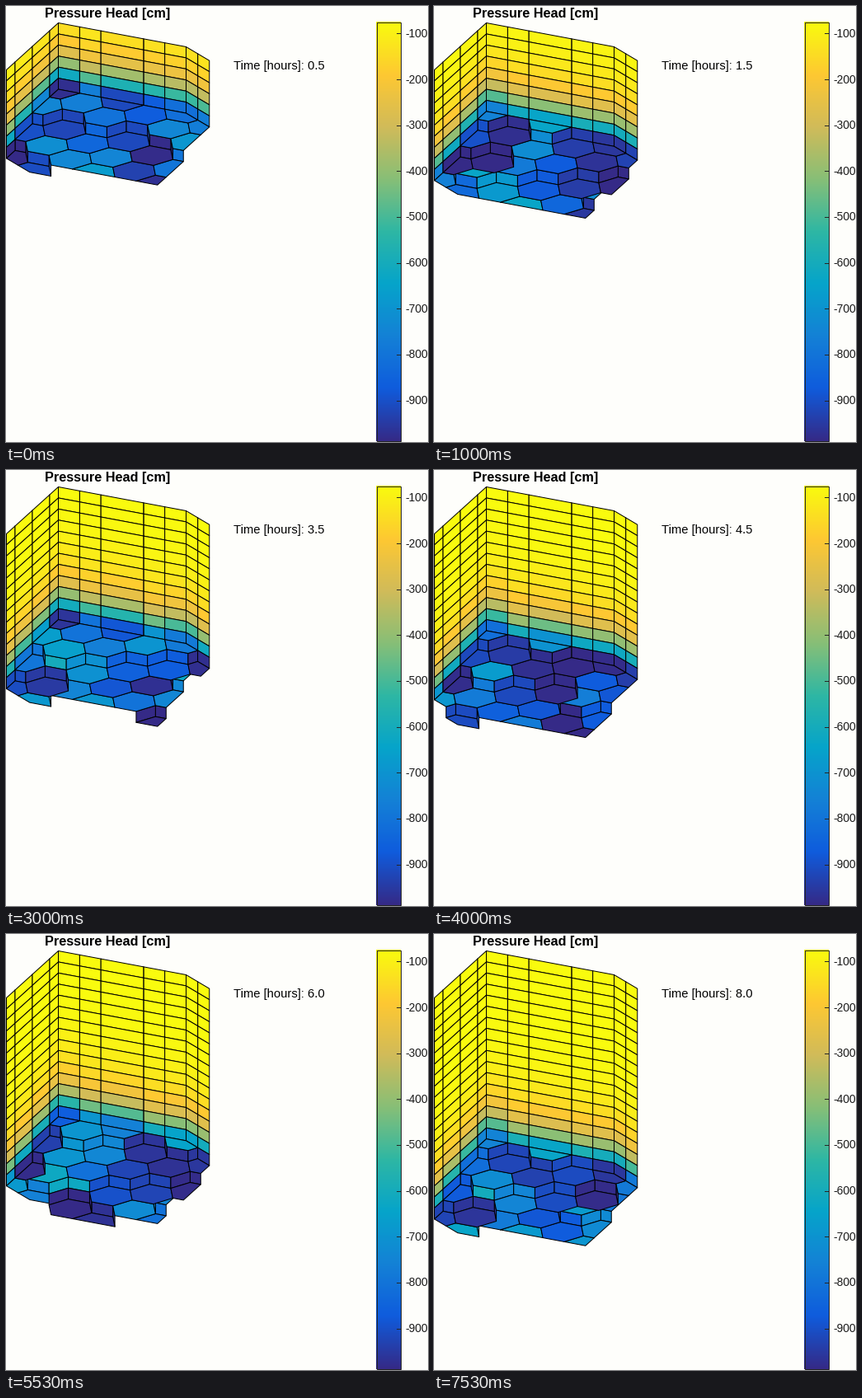
Animation, 512 px wide and 529 px high, one loop 8000 ms. Source, as a matplotlib script:

```python
import numpy as np
import matplotlib.pyplot as plt
from matplotlib.animation import FuncAnimation
from matplotlib.collections import PolyCollection
from matplotlib.colors import LinearSegmentedColormap, Normalize
from matplotlib.patches import Rectangle

W, H, DPI = 512, 529, 128
PX = 72 / DPI
FRAMES, INTERVAL = 16, 500
LAYER = 13.42
WET, DRY = -75, -988
plt.rcParams["font.family"] = "Liberation Sans"

CMAP = LinearSegmentedColormap.from_list("heads", [
    "#352a87", "#0f5cdd", "#1481d6", "#06a4ca", "#2eb7a4",
    "#87bf77", "#d1bb59", "#fec832", "#f9fb0e"])
NORM = Normalize(DRY, WET, clip=True)

# Domain outline as half planes a*k + b*i <= c
WALLS = [(-1, 0, 0), (1, 0, 5), (0, 1, 3), (0, -1, 0.5), (-0.5, -1, 0), (0.5, 1, 5)]


def project(k, i):
    return 0.5 + 38.75 * k + 21 * i, 77.5 + 7.25 * k - 19 * i


def clip(poly, a, b, c):
    out = []
    for p, q in zip(poly, poly[1:] + poly[:1]):
        dp, dq = (a * v[0] + b * v[1] - c for v in (p, q))
        if dp <= 1e-9:
            out.append(p)
        if (dp < -1e-9 and dq > 1e-9) or (dp > 1e-9 and dq < -1e-9):
            s = dp / (dp - dq)
            out.append((p[0] + s * (q[0] - p[0]), p[1] + s * (q[1] - p[1])))
    return out


def make_cell(k, i):
    """Outline of one column and the edges that face the viewer."""
    third = 1 / 3
    poly = [(k + 2 * third, i), (k + third, i + 0.5), (k - third, i + 0.5),
            (k - 2 * third, i), (k - third, i - 0.5), (k + third, i - 0.5)]
    for wall in WALLS:
        poly = clip(poly, *wall)
    pts = np.array([project(*p) for p in poly])
    cx, cy = pts.mean(axis=0)
    edges = []
    for p, q in zip(pts, np.roll(pts, -1, axis=0)):
        if p[0] > q[0]:
            p, q = q, p
        if (q[0] - p[0]) * (cy - p[1]) - (q[1] - p[1]) * (cx - p[0]) > 1e-6:
            edges.append((p, q))
    return pts, edges


# Hexagonal columns, far to near; odd rows are shifted by half a cell
KEYS = sorted(((k, i - k % 2 / 2) for k in range(6) for i in range(4)),
              key=lambda c: -project(*c)[1])
CELLS = {key: make_cell(*key) for key in KEYS}
PHASE = dict(zip(KEYS, np.random.default_rng(7).uniform(0, 2 * np.pi, len(KEYS))))


def wet_depth(key, t):
    """Wetting depth in layers: infiltration, tilt, twist and a slow wobble."""
    k, i = key
    infiltration = 3.78 + 4.54 * np.sqrt(t) + 0.316 * t
    tilt = (0.42 + 0.03 * t) * (1.3 - i)
    twist = 0.08 * (i - 1.5) * (k - 2.5)
    rough = 0.4 * min(1, k, 3 - i)
    front = infiltration + tilt + twist + rough * np.sin(1.5 * t + PHASE[key])
    # The front lingers each time it enters a new layer
    depth = int(front)
    return depth, (front - depth) ** 1.7


def build(t):
    """All faces from far to near, with their heads."""
    polys, heads = [], []
    for key in KEYS:
        pts, edges = CELLS[key]
        depth, part = wet_depth(key, t)
        behind = part + depth - 1 - np.arange(depth)
        layer_heads = WET + (DRY - WET) * np.exp(-behind / 1.95)
        for p, q in edges:
            for j in range(depth):
                up, down = (0, j * LAYER), (0, (j + 1) * LAYER)
                polys.append([p + up, q + up, q + down, p + down])
                heads.append(layer_heads[j])
        polys.append(pts + (0, depth * LAYER))
        heads.append(layer_heads[-1])
    return polys, np.array(heads)


fig = plt.figure(figsize=(W / DPI, H / DPI), dpi=DPI, facecolor="#fefefb")
ax = fig.add_axes([0, 0, 1, 1])
ax.axis("off")

# Colour bar
X0, X1, Y0, Y1 = 449.5, 478.5, 19.5, 527.5
ramp = np.linspace(1, 0, 256)[:, None]
ax.imshow(ramp, cmap=CMAP, extent=(449, 479, 528, 19), aspect="auto",
          vmin=0, vmax=1, interpolation="nearest")
ax.add_patch(Rectangle((X0, Y0), X1 - X0, Y1 - Y0, fill=False, lw=PX, ec="#262626"))
for value in range(-100, -1000, -100):
    y = Y0 + (WET - value) / (WET - DRY) * (Y1 - Y0)
    ax.plot([X1 - 5, X1], [y, y], color="#262626", lw=PX)
    ax.text(484, y + 4.5, str(value), size=13.7 * PX, color="#1a1a1a", va="baseline")

ax.text(123.3, 14.3, "Pressure Head [cm]", size=16.2 * PX, weight="bold",
        ha="center", va="baseline")
clock = ax.text(276, 77.5, "", size=14.8 * PX, va="baseline")
soil = PolyCollection([], edgecolors="black", linewidths=PX, joinstyle="round")
ax.add_collection(soil, autolim=False)
ax.set_xlim(0, W)
ax.set_ylim(H, 0)


def update(n):
    hour = (n + 1) / 2
    polys, heads = build(hour)
    soil.set_verts(polys)
    soil.set_facecolor(CMAP(NORM(heads)))
    clock.set_text(f"Time [hours]: {hour:.1f}")
    return [soil, clock]


anim = FuncAnimation(fig, update, frames=FRAMES, interval=INTERVAL,
                     repeat=True, repeat_delay=0, blit=False)
plt.show()
```
